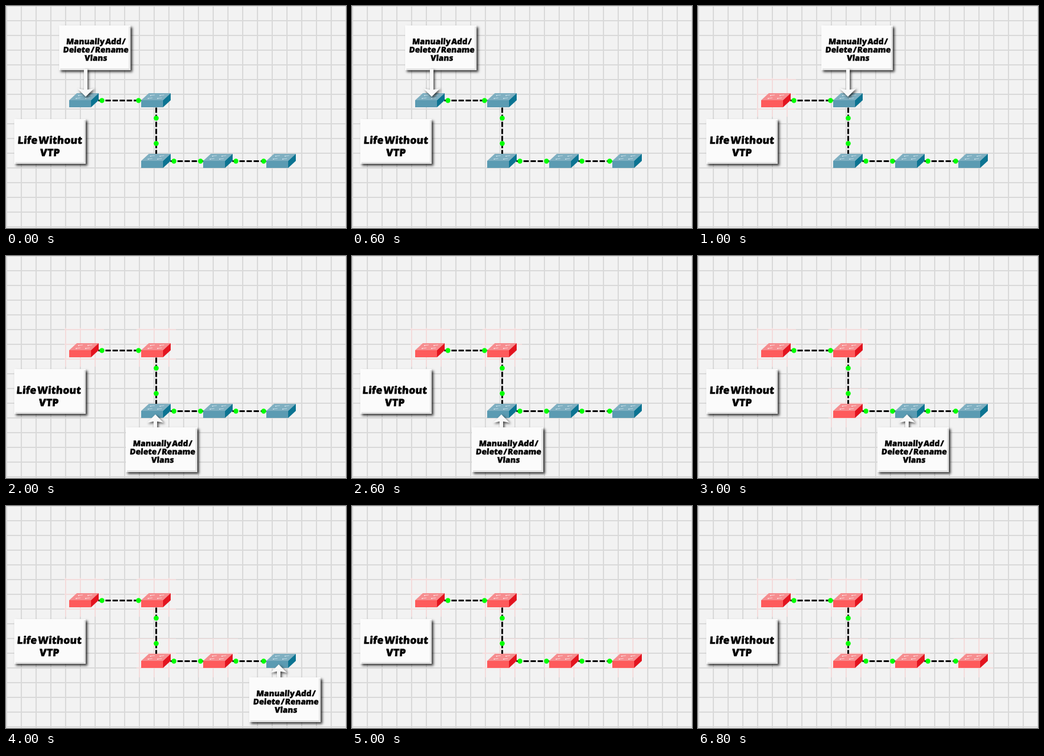
An HTML page with a canvas that plays this animation: 576 px wide and 377 px high, repeating every 8000 ms.

```html
<!DOCTYPE html>
<html lang="en">
<head>
<meta charset="utf-8">
<title>Life Without VTP</title>
<style>
  html, body { margin: 0; width: 100%; height: 100%; overflow: hidden; background: #f2f2f2; }
  canvas { display: block; }
</style>
</head>
<body>
<canvas id="stage" width="576" height="377"></canvas>
<script>
const stage = document.getElementById('stage');
const ctx = stage.getContext('2d');
const LOOP = 8000, STEP = 1000, GRID = 25;
const WIDTH = 50, DEPTH = 12, FRONT = 37;

const BLUE = { top: '#7fafc1', front: '#5b9bb2', side: '#0c7492', mark: '#b9d6e1' };
const RED = { top: '#f68d8f', front: '#fe5a5b', side: '#e3141f', mark: '#fbd0d0' };

const switches = [
  { x: 107, y: 148, noteX: 90 },
  { x: 229, y: 148, noteX: 209 },
  { x: 229, y: 251, noteX: 203 },
  { x: 334, y: 251, noteX: 304 },
  { x: 441, y: 251, noteX: 412 }
];

function poly(points, fill) {
  ctx.beginPath();
  points.forEach(([x, y]) => ctx.lineTo(x, y));
  ctx.closePath();
  ctx.fillStyle = fill;
  ctx.fill();
}

function grid(color) {
  ctx.fillStyle = color;
  for (let x = 0; x < stage.width; x += GRID) ctx.fillRect(x, 0, 2, stage.height);
  for (let y = -1; y < stage.height; y += GRID) ctx.fillRect(0, y, stage.width, 2);
}

function pinkGrid({ x, y }) {
  ctx.save();
  ctx.beginPath();
  ctx.rect(x - 8, y - 26, 67, 66);
  ctx.clip();
  grid('#f3dcdc');
  ctx.restore();
}

function light(x, y) {
  ctx.fillStyle = '#0f0';
  ctx.beginPath();
  ctx.arc(x + 0.5, y + 0.5, 4.2, 0, 2 * Math.PI);
  ctx.fill();
}

// Calls visit with the two cable ends and how far the lights sit from them.
function eachLink(visit) {
  switches.slice(1).forEach((b, i) => {
    const a = switches[i];
    if (a.y === b.y) visit(a.x + WIDTH - 1, a.y + DEPTH, b.x, b.y + DEPTH, 6, 5);
    else visit(a.x + WIDTH / 2, a.y + 2 * DEPTH, b.x + WIDTH / 2, b.y, 18, 18);
  });
}

function cable(x1, y1, x2, y2) {
  ctx.setLineDash([9, 3]);
  ctx.lineWidth = 3;
  ctx.strokeStyle = '#000';
  ctx.beginPath();
  ctx.moveTo(x1 + 0.5, y1 + 0.5);
  ctx.lineTo(x2 + 0.5, y2 + 0.5);
  ctx.stroke();
  ctx.setLineDash([]);
}

function cableLights(x1, y1, x2, y2, near, far) {
  const dx = Math.sign(x2 - x1), dy = Math.sign(y2 - y1);
  light(x1 + dx * near, y1 + dy * near);
  light(x2 - dx * far, y2 - dy * far);
}

function networkSwitch({ x, y }, c) {
  const back = WIDTH - FRONT;
  ctx.save();
  ctx.translate(x, y);
  poly([[0, DEPTH], [back, 0], [WIDTH, 0], [FRONT, DEPTH]], c.top);
  poly([[0, DEPTH], [FRONT, DEPTH], [FRONT, 2 * DEPTH], [0, 2 * DEPTH]], c.front);
  poly([[FRONT, DEPTH], [WIDTH, 0], [WIDTH, DEPTH], [FRONT, 2 * DEPTH]], c.side);
  ctx.strokeStyle = ctx.fillStyle = c.mark;
  ctx.lineWidth = 1;
  for (let i = 0; i < 4; i++) {
    const mx = 15 + 16 * (i % 2) - 4 * (i >> 1), my = 4 + 5 * (i >> 1);
    ctx.beginPath();
    ctx.moveTo(mx, my);
    ctx.lineTo(mx + 8, my - 1);
    ctx.stroke();
    ctx.fillRect(mx, my - 1, 2, 2);
  }
  ctx.restore();
}

function shadow(blur, offset, color) {
  ctx.shadowBlur = blur;
  ctx.shadowOffsetX = ctx.shadowOffsetY = offset;
  ctx.shadowColor = color;
}

function card(x, y) {
  const w = 121, h = 76;
  ctx.save();
  shadow(4, 3, 'rgba(0,0,0,.75)');
  ctx.fillStyle = '#fbfbfb';
  ctx.fillRect(x, y, w, h);
  ctx.restore();
  ctx.fillStyle = '#e3e3e3';
  ctx.fillRect(x + w - 3, y + 2, 3, h - 2);
  ctx.fillRect(x + 2, y + h - 3, w - 2, 3);
}

// Heavy, slightly slanted lettering with tight word gaps.
function label(text, cx, baseline, size) {
  ctx.save();
  ctx.transform(1, 0, -0.07, 1, cx, baseline);
  ctx.font = `800 ${size}px "Open Sans", sans-serif`;
  ctx.wordSpacing = `${-size / 6}px`;
  ctx.textAlign = 'center';
  ctx.fillStyle = ctx.strokeStyle = '#000';
  ctx.lineWidth = 0.4;
  ctx.fillText(text, 0, 0);
  ctx.strokeText(text, 0, 0);
  ctx.restore();
}

// The tip points down for dir 1 and up for dir -1.
function arrow(tipX, tipY, length, dir) {
  const half = [[14, 14], [3, 12], [3, length]];
  const mirrored = half.map(([x, y]) => [-x, y]).reverse();
  ctx.save();
  shadow(4, 2, 'rgba(0,0,0,.75)');
  poly([[0, 0], ...half, ...mirrored].map(([x, y]) => [tipX + x, tipY - dir * y]), '#f8f8f8');
  ctx.restore();
}

function note({ noteX: x, y: switchY }) {
  const above = switchY < stage.height / 2;
  const y = switchY + (above ? -115 : 40);
  if (!above) arrow(x + 50, y - 22, 24, -1);
  card(x, y);
  if (above) arrow(x + 45, y + 121, 47, 1);
  ['Manually Add /', 'Delete / Rename', 'Vlans'].forEach((line, i) =>
    label(line, x + 62, y + 32 + 14 * i, 13.5));
}

function draw(time) {
  const step = Math.min(switches.length, Math.floor((time % LOOP) / STEP));
  ctx.fillStyle = '#f2f2f2';
  ctx.fillRect(0, 0, stage.width, stage.height);
  grid('#d9d9d9');
  switches.slice(0, step).forEach(pinkGrid);
  eachLink(cable);
  switches.forEach((s, i) => networkSwitch(s, i < step ? RED : BLUE));
  eachLink(cableLights);

  // The title jumps slightly left on every other step.
  const jump = step && step % 2 === 0 ? step / 2 - 3 : 0;
  card(14, 192);
  label('Life Without', 74 + jump, 234, 17.4);
  label('VTP', 74 + jump, 255, 17.4);
  if (switches[step]) note(switches[step]);
}

const start = performance.now();
function tick() {
  draw(performance.now() - start);
  requestAnimationFrame(tick);
}
tick();
</script>
</body>
</html>
```
